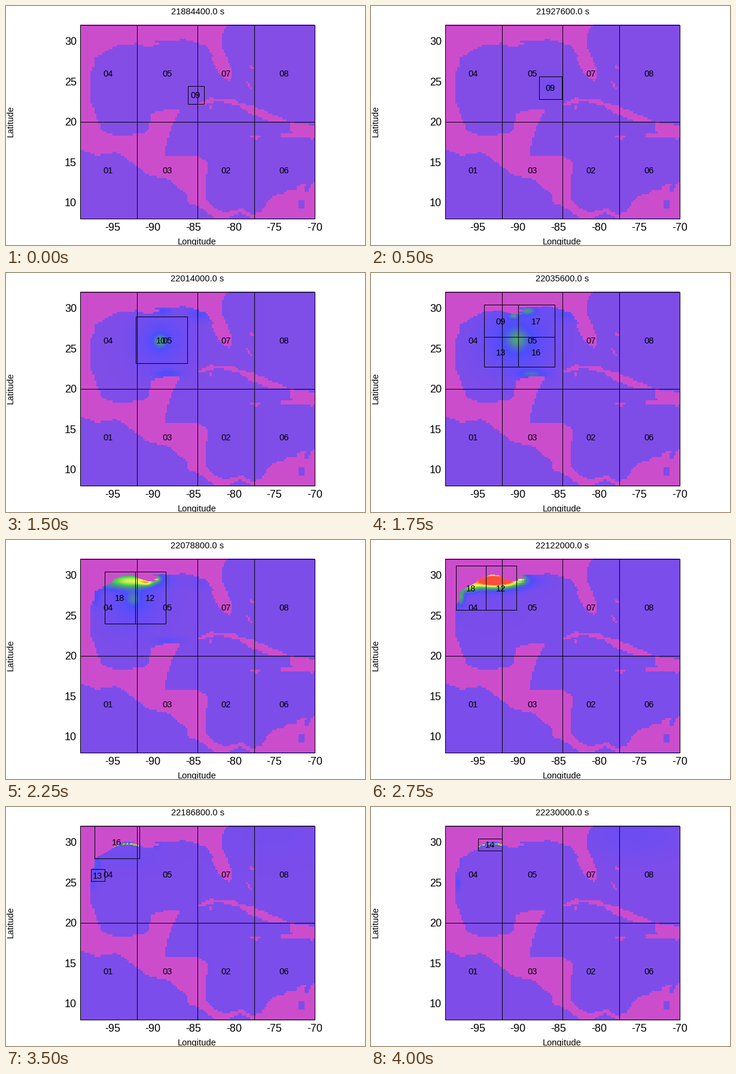
Write a matplotlib script that moves like this. It is 600 by 400 pixels and loops after 4.25 s.

```python
import numpy as np
import matplotlib.pyplot as plt
from matplotlib.animation import FuncAnimation
from matplotlib.colors import LinearSegmentedColormap
from matplotlib.patches import Rectangle
from matplotlib.path import Path

plt.rcParams["font.family"] = "Liberation Sans"

# Map area in stage pixels: lon -99..-70, lat 32..8
LEFT, RIGHT, TOP, BOTTOM = 124, 516, 31, 356
DEG = (RIGHT - LEFT) / 29
CELL = DEG / 4
FRAMES, STEP = 17, 21600
LAND = "#cc4dcc"
SMALL, LARGE = 10.5, 13

SURGE = LinearSegmentedColormap.from_list("surge", [
    (0, "#844de6"), (.13, "#6a4df4"), (.25, "#4d4dff"), (.5, "#4da27c"),
    (.6, "#4dd24d"), (.8, "#ffff4d"), (1, "#ff4d40")], N=512)

FLORIDA = [(370, 31), (362, 46), (362, 70), (378, 108), (378, 121), (371, 125),
           (356, 113), (344, 88), (346, 82), (333, 66), (299, 56), (244, 58),
           (257, 63), (246, 66), (254, 69)]
GULF = [(238, 69), (217, 63), (190, 64), (176, 71), (147, 87), (148, 100),
        (142, 109), (141, 157), (160, 208), (168, 212), (190, 218), (230, 213),
        (238, 206), (243, 180), (265, 174), (290, 174), (280, 195), (272, 217),
        (264, 250)]
CARIBBEAN = [(320, 251), (337, 262), (332, 319), (340, 332), (365, 347),
             (393, 338), (413, 350), (428, 343), (441, 322), (447, 317),
             (465, 315), (469, 309), (484, 308), (487, 300), (502, 299),
             (497, 313), (506, 313), (509, 298), (516, 293), (516, 356)]
PACIFIC = [(411, 356), (391, 346), (368, 356), (351, 356), (322, 335),
           (305, 330), (302, 316), (272, 290), (238, 283), (200, 254),
           (182, 245), (152, 250), (124, 240), (124, 31)]
CUBA = [(320, 164), (340, 154), (382, 156), (388, 161), (412, 167), (457, 186),
        (478, 195), (440, 192), (411, 181), (390, 168), (368, 162), (353, 159),
        (324, 167)]
HISPANIOLA = [(478, 194), (516, 200), (516, 218), (510, 223), (502, 219),
              (457, 219), (457, 215), (481, 215), (474, 207)]
JAMAICA = [(403, 216), (428, 217), (419, 225)]
BAHAMAS = [(401, 127), (406, 127), (413, 144)]
ABACO = [(407, 98), (420, 106), (411, 107)]
FLOODED = [(176, 71), (182, 65), (200, 58), (213, 59), (232, 70)]


def block(x, y, w, h):
    return [(x, y), (x + w, y), (x + w, y + h), (x, y + h)]


LANDS = [FLORIDA + GULF + CARIBBEAN + PACIFIC, CUBA, HISPANIOLA, JAMAICA,
         BAHAMAS, ABACO, block(340, 167, 5, 6)]
LAKE = block(489, 325, 9, 13)

# Standing water: x, y, width, height, level, peak step, rise and fall in steps
BUMPS = [
    (238, 72, 6, 3, .45, 7.5, 1.5, 2.5),
    (262, 63, 10, 5, .33, 7, 2, 2.5),
    (252, 65, 4, 4, .35, 9, 2, 9),
    (206, 68, 33, 9, 1.2, 11, 4, 1.8),
    (232, 70, 9, 4, .3, 9.3, 2, 2.7),
    (164, 80, 10, 6, .4, 11, 2.5, 2),
    (150, 96, 5, 11, .55, 11.7, 4, 4.5),
    (145, 128, 4, 8, .18, 16, 6, 1),
    (270, 169, 17, 5, .26, 7, 4, 4),
    (325, 68, 16, 9, .18, 6, 4, 5),
    (200, 84, 36, 13, .12, 13, 2, 2),
    (440, 45, 60, 28, .09, 16, 3, 1),
]

# Storm track keys: eye, core and halo strength, core and halo radius
TRACK_STEPS = (0, 5, 7, 9, 11)
TRACK = np.array([(318, 148, 0, 0, 4, 12),
                  (272, 117, .35, .11, 5, 25),
                  (244, 111, .24, .24, 11, 42),
                  (213, 99, .2, .17, 8, 36),
                  (198, 68, 0, .06, 8, 36)])
# Refined area that follows the storm: x0, y0, x1, y1
AREA = np.array([(303, 133, 330, 163),
                 (245, 92, 299, 143),
                 (188, 52, 306, 156),
                 (164, 52, 266, 139),
                 (141, 42, 242, 116)])


def keyed(i, keys):
    return [np.interp(i, TRACK_STEPS, column) for column in keys.T]


def patches(i):
    """Refined patches at step i as (x0, y0, x1, y1, label)."""
    if i >= 15:
        return [(178, 52, 218, 72, "14")]
    if i >= 13:
        return [(147, 31, 222, 85, "16"), (141, 103, 164, 123, "13")]
    x0, y0, x1, y1 = np.round(keyed(i, AREA)).astype(int)
    xm = (x0 + x1) // 2
    if i < 7:
        return [(x0, y0, x1, y1, "09" if i < 3 else "10")]
    if i == 7:
        xm, ym = xm - 2, y0 + 54
        return [(x0, y0, xm, ym, "09"), (xm, y0, x1, ym, "17"),
                (x0, ym, xm, y1, "13"), (xm, ym, x1, y1, "16")]
    return [(x0, y0, xm, y1, "18"), (xm, y0, x1, y1, "12")]


def inside(poly, x, y):
    pts = np.column_stack([x.ravel(), y.ravel()])
    return Path(poly).contains_points(pts).reshape(x.shape)


def land_mask(x, y):
    land = np.any([inside(p, x, y) for p in LANDS], axis=0)
    return land & ~inside(LAKE, x, y)


def snap(v, start):
    return start + (np.floor((v - start) / CELL) + .5) * CELL


fine = np.meshgrid(np.arange(LEFT, RIGHT) + .5, np.arange(TOP, BOTTOM) + .5)
coarse = snap(fine[0], LEFT), snap(fine[1], TOP)
land_fine, land_coarse = land_mask(*fine), land_mask(*coarse)
flood = inside(FLOODED, *fine)
speckle = np.random.default_rng(4).uniform(.2, 1.3, (163, 196))
speckle = speckle.repeat(2, 0).repeat(2, 1)[:BOTTOM - TOP, :RIGHT - LEFT]


def bump(x, y, cx, cy, sx, sy):
    return np.exp(-.5 * (((x - cx) / sx) ** 2 + ((y - cy) / sy) ** 2))


def surface(i, x, y):
    """Scaled sea surface height at step i."""
    ex, ey, core, halo, r, wide = keyed(i, TRACK)
    halo *= np.interp(i, (11, 13), (1, 0))
    h = np.full(x.shape, np.interp(i, (0, 13, 16), (0, .05, .03)))
    h += core * bump(x, y, ex, ey, r, r) + halo * bump(x, y, ex, ey, wide, wide)
    for *shape, level, peak, rise, fall in BUMPS:
        level *= np.interp(i, (peak - rise, peak, peak + fall), (0, 1, 0))
        if level:
            h += level * bump(x, y, *shape)
    if i >= 12:
        # Water left behind along the flooded shore
        arc = 61.5 + 4 * ((x - 203) / 22) ** 2
        strip = np.exp(-((y - arc) / 2.2) ** 2) * (abs(x - 201) < 22)
        h += strip * np.interp(i, (12, 13, 16), (.8, .95, .75)) * speckle ** (i > 13)
    return h


def picture(i):
    refined = np.zeros(land_fine.shape, bool)
    for x0, y0, x1, y1, _ in patches(i):
        refined[y0 - TOP:y1 - TOP, x0 - LEFT:x1 - LEFT] = True
    x, y = (np.where(refined, f, c) for f, c in zip(fine, coarse))
    land = np.where(refined, land_fine, land_coarse)
    if i >= 9:
        land &= ~(flood & refined)
    rgb = SURGE(np.clip(surface(i, x, y), 0, 1))[..., :3]
    rgb[land] = plt.matplotlib.colors.to_rgb(LAND)
    return rgb


fig = plt.figure(figsize=(6, 4), dpi=100, facecolor="white")
ax = fig.add_axes([0, 0, 1, 1])
sea = ax.imshow(picture(0), extent=(LEFT, RIGHT, BOTTOM, TOP),
                interpolation="nearest", aspect="auto")
ax.set(xlim=(0, 600), ylim=(400, 0))
ax.axis("off")


def text(x, y, s, size=SMALL, **kw):
    kw = {"ha": "center", "va": "center_baseline", **kw}
    return ax.text(x, y, s, size=size, color="black", **kw)


def box(x0, y0, x1, y1):
    return ax.add_patch(Rectangle((x0 + .5, y0 + .5), x1 - x0, y1 - y0,
                                  fill=False, ec="black", lw=.72))


def patch(x0, y0, x1, y1, name):
    return [box(x0, y0, x1, y1),
            text((x0 + x1) / 2 + .5, (y0 + y1) / 2 + 1, name)]


# Base grid with its eight numbered patches
XS, YS = (123, 218, 319.5, 414, 515), (31, 193, 355)
NAMES = [("04", "05", "07", "08"), ("01", "03", "02", "06")]
for row, names in enumerate(NAMES):
    for col, name in enumerate(names):
        patch(XS[col], YS[row], XS[col + 1], YS[row + 1], name)

for lon in range(-95, -69, 5):
    text(LEFT + (lon + 99) * DEG, 369, str(lon), LARGE)
for lat in range(10, 31, 5):
    text(118, TOP + (32 - lat) * DEG + .5, str(lat), LARGE, ha="right")
text(319.5, 393, "Longitude")
text(8, 193, "Latitude", rotation=90, va="center")
title = text(320, 8, "")
extras = []


def draw(i):
    while extras:
        extras.pop().remove()
    sea.set_data(picture(i))
    title.set_text(f"{21884400 + STEP * i:.1f} s")
    for item in patches(i):
        extras.extend(patch(*item))
    return [sea, title, *extras]


anim = FuncAnimation(fig, draw, frames=FRAMES, interval=250,
                     init_func=lambda: draw(0), repeat=True, repeat_delay=0)
plt.show()
```
